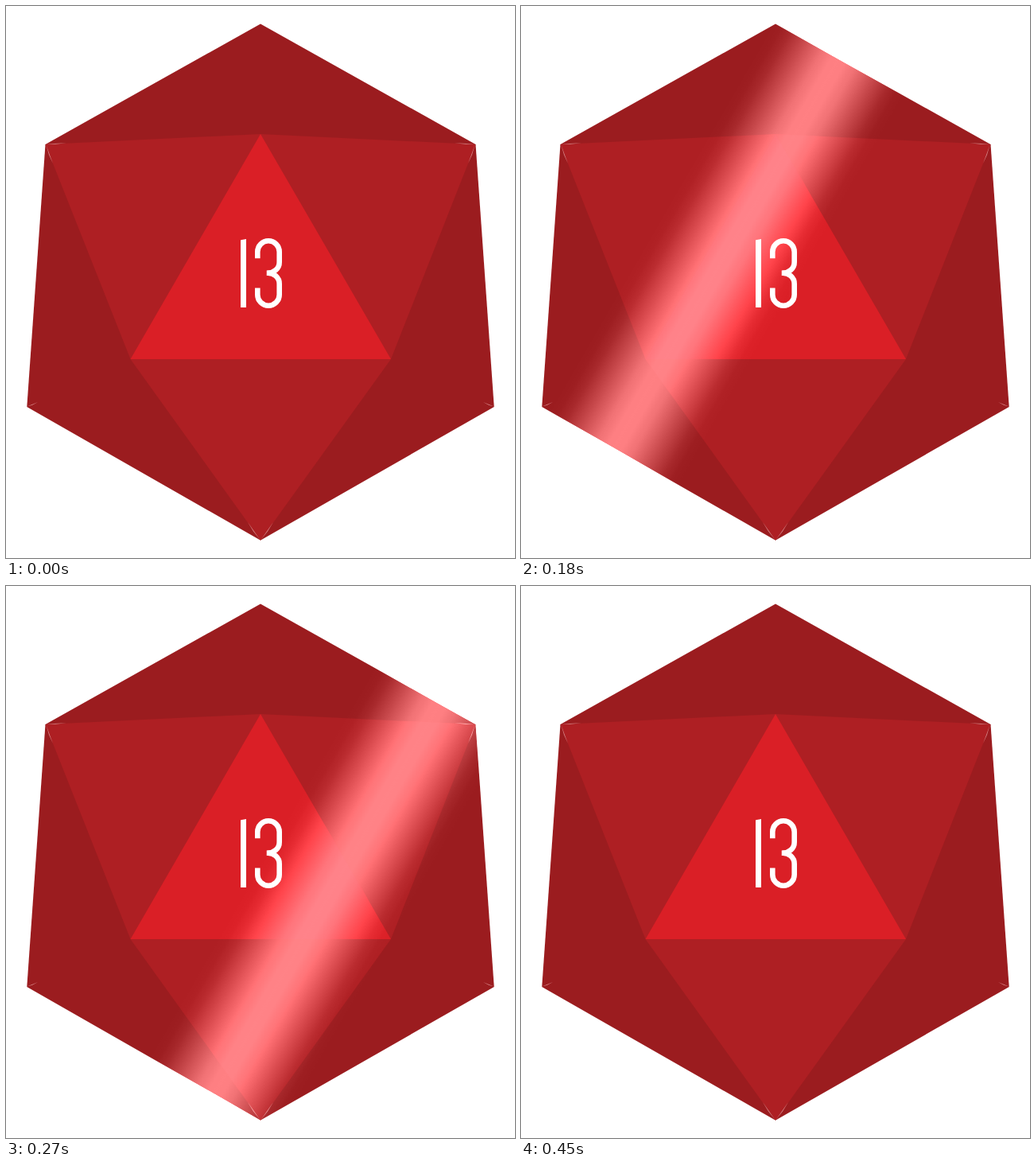
An HTML page that plays this animation: 640x694 px, repeating every 4.5 s.

```html
<!DOCTYPE html>
<html lang="en">
<head>
<meta charset="utf-8">
<title>Shining die</title>
<style>
  html, body { margin: 0; width: 100%; height: 100%; overflow: hidden; background: #fff; }
  svg { display: block; width: 640px; height: 694px; }
  .dark { fill: #9b1c1f; }
  .mid { fill: #ae1f23; }
  .bright { fill: #da1f26; }
  .seams { fill: #d8888a; }
  .digits { fill: none; stroke: #fff; stroke-width: 6.6; }

  /* The sheen adds light, so white areas stay white. */
  .sheen { mix-blend-mode: plus-lighter; }
  .band { animation: sweep 4500ms infinite; }
  @keyframes sweep {
    0% { transform: translateX(47.5px); animation-timing-function: steps(15, end); }
    10%, 100% { transform: translateX(878.5px); }
  }
</style>
</head>
<body>
<svg viewBox="0 0 640 694" role="img" aria-label="13">
  <defs>
    <linearGradient id="glow">
      <stop offset="0" stop-color="#fff" stop-opacity="0"/>
      <stop offset=".06" stop-color="#fff" stop-opacity=".01"/>
      <stop offset=".125" stop-color="#fff" stop-opacity=".05"/>
      <stop offset=".25" stop-color="#fff" stop-opacity=".19"/>
      <stop offset=".375" stop-color="#fff" stop-opacity=".335"/>
      <stop offset=".45" stop-color="#fff" stop-opacity=".388"/>
      <stop offset=".5" stop-color="#fff" stop-opacity=".392"/>
      <stop offset=".55" stop-color="#fff" stop-opacity=".388"/>
      <stop offset=".625" stop-color="#fff" stop-opacity=".335"/>
      <stop offset=".75" stop-color="#fff" stop-opacity=".19"/>
      <stop offset=".875" stop-color="#fff" stop-opacity=".05"/>
      <stop offset=".94" stop-color="#fff" stop-opacity=".01"/>
      <stop offset="1" stop-color="#fff" stop-opacity="0"/>
    </linearGradient>
    <path id="seam" d="M50 173.5L76 172.2L62 173.7Z M50.5 175L59 198L54 187Z
      M26.5 503.5L40 498L33 501.7Z M319.5 671L304 649L311 660.5Z"/>
  </defs>

  <rect width="640" height="694" fill="#fff"/>
  <path class="dark" d="M320 22.5L590.5 174L613.7 504L320 671.7L26.3 504L49.5 174Z"/>
  <path class="mid" d="M49.5 174L320 161L590.5 174L484 444L320 671.7L156.5 444Z"/>
  <path class="bright" d="M320 161L484 444H156.5Z"/>
  <g class="seams">
    <use href="#seam"/>
    <use href="#seam" transform="matrix(-1 0 0 1 640 0)"/>
  </g>

  <g class="sheen" transform="rotate(30)">
    <rect class="band" x="-95" y="-400" width="190" height="1100" fill="url(#glow)"/>
  </g>

  <path fill="#fff" d="M295 294.3L302 293V379H295Z"/>
  <path class="digits" d="M316.3 317.3V309A13.7 13.7 0 0 1 343.7 309V322
    A14.5 13.5 0 0 1 328 335.7A14.5 13.5 0 0 1 343.7 349.5V363
    A13.7 13.7 0 0 1 316.3 363V354.5"/>
</svg>
</body>
</html>
```
